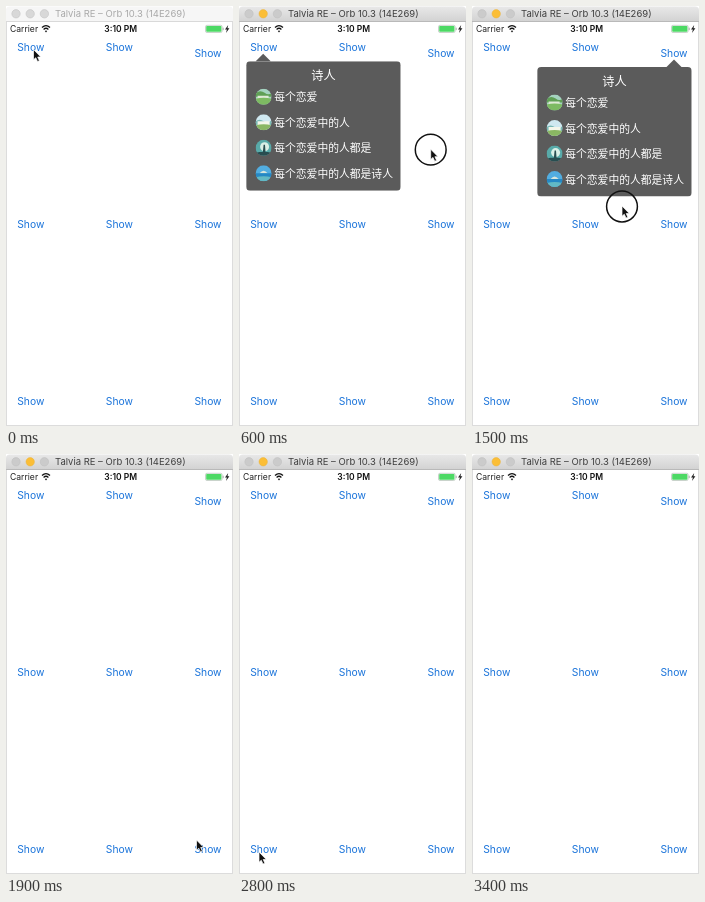
These frames come from a looping animation (227x420 px, 3500 ms). An HTML page:

```html
<!DOCTYPE html>
<html lang="zh-CN">
<head>
<meta charset="utf-8">
<title>Popup menu</title>
<style>
  html, body { margin: 0; width: 100%; height: 100%; overflow: hidden; background: #fff; }
  svg { display: block; }
  text { font-family: Inter, "Liberation Sans", sans-serif; }
  .cjk { font-family: "Noto Sans CJK SC", "Noto Sans CJK", sans-serif; fill: #fff; font-size: 10.8px; }
  .show { font-size: 10.3px; fill: #1b74da; text-anchor: middle; }
</style>
</head>
<body>
<svg width="227" height="420" viewBox="0 0 227 420">
  <defs>
    <linearGradient id="activeBar" x2="0" y2="1">
      <stop stop-color="#e8e8e8"/><stop offset="1" stop-color="#d2d2d2"/>
    </linearGradient>
    <clipPath id="round"><circle r="8"/></clipPath>
  </defs>
  <path d="M.5 420V15H226.5V420" fill="#fff" stroke="#dcdcdc"/>
  <path d="M0 419.5H227" stroke="#dcdcdc"/>

  <path id="bar" d="M0 15.5V4Q0 .5 4 .5H223Q227 .5 227 4V15.5Z"/>
  <path id="barLine" d="M0 15.5H227"/>
  <g stroke-width=".5">
    <circle class="light" cx="10" cy="7.8" r="4.2"/>
    <circle class="light" cx="24.2" cy="7.8" r="4.2"/>
    <circle class="light" cx="38.4" cy="7.8" r="4.2"/>
  </g>
  <text id="title" x="49" y="11.3" font-size="9.47">Talvia RE – Orb 10.3 (14E269)</text>

  <text x="4" y="26.2" font-size="8.6" fill="#222">Carrier</text>
  <g fill="none" stroke="#111" stroke-width="1.3">
    <path d="M36 21.5Q40 17.8 44 21.5M37.6 23.4Q40 21.2 42.4 23.4"/>
    <path d="M40 26.4L38.8 24.9Q40 24 41.2 24.9Z" fill="#111" stroke="none"/>
  </g>
  <text x="114.7" y="26.2" font-size="8.5" font-weight="600" text-anchor="middle" fill="#111">3:10 PM</text>
  <rect x="199.5" y="19.3" width="16.6" height="7.2" rx="1.4" fill="#fff" stroke="#a5b5a8" stroke-width=".6"/>
  <rect x="200.2" y="20" width="15.2" height="5.8" rx=".7" fill="#4cd964"/>
  <path d="M217.2 21.7V24.2" stroke="#999" stroke-width=".8"/>
  <path d="M222.2 19L219 23.6H220.9L220 27L223.4 22.2H221.5Z" fill="#222"/>

  <g id="buttons"></g>

  <g id="popup" fill="#000" fill-opacity=".645">
    <path id="arrow"/>
    <svg id="panel" width="154.5">
      <rect id="box" width="154.5" rx="4"/>
      <g id="menu" fill-opacity="1">
        <text class="cjk" x="77.2" y="18.8" style="font-size:12.2px" text-anchor="middle">诗人</text>
      </g>
    </svg>
  </g>

  <circle id="ring" r="15.4" fill="none" stroke="#111" stroke-width="1.5"/>
  <path id="cursor" d="M0 0V10.2L2.3 8.2L4 12L5.9 11.2L4.2 7.5H7.3Z" fill="#111" stroke="#fff" stroke-width=".7"/>
</svg>
<script>
const $ = id => document.getElementById(id);
const set = (el, attrs) => { for (const k in attrs) el.setAttribute(k, attrs[k]); };
const LOOP = 3500, STEP = 100, FULL = 129.6;

const buttons = [];
for (const row of [0, 1, 2]) for (const col of [0, 1, 2]) {
  const y = row ? 45 + row * 177 : col == 2 ? 50.5 : 45;
  const x = 24.8 + col * 88.6;
  $('buttons').insertAdjacentHTML('beforeend', `<text class="show" x="${x}" y="${y}">Show</text>`);
  buttons.push($('buttons').lastChild);
}

// Small landscape thumbnails, each drawn around its own centre
const scenes = [
  `<path fill="#a5d3c0" d="M-8-8H8V8H-8Z"/><path fill="#5f9f55" d="M-8-4Q-3-7 1-4T8-4V0H-8Z"/>
   <path fill="#dfe9d6" d="M-6-1H5V2H-6Z"/><path fill="#7dba62" d="M-8 2Q0 0 8 2V8H-8Z"/>`,
  `<path fill="#cfe8f0" d="M-8-8H8V8H-8Z"/><path fill="#79b9b5" d="M-8-1Q-4-4 0-1T8-2V3H-8Z"/>
   <path fill="#f4f6ea" d="M-6-1H6V3H-6Z"/><path fill="#8ab763" d="M-8 3Q0 1 8 3V8H-8Z"/>`,
  `<path fill="#58aaa9" d="M-8-8H8V8H-8Z"/><circle fill="#d9efe6" cx="1" cy="-1" r="4.5"/>
   <path fill="#284d50" d="M-8 5Q0 3 8 5V8H-8ZM0-3H1.4L2 5H-.8Z"/>`,
  `<path fill="#52ade0" d="M-8-8H8V8H-8Z"/><path fill="#d8e6dc" d="M-4 0Q0-5 4 0Z"/>
   <path fill="#2588c4" d="M-8 0H8V4H-8Z"/><path fill="#62b9c4" d="M-8 4Q0 2 8 4V8H-8Z"/>`
];
['每个恋爱', '每个恋爱中的人', '每个恋爱中的人都是', '每个恋爱中的人都是诗人'].forEach((label, i) => {
  const y = 35.6 + i * 25.5;
  $('menu').insertAdjacentHTML('beforeend',
    `<g transform="translate(17.4 ${y})" clip-path="url(#round)">${scenes[i]}</g>
     <text class="cjk" x="28" y="${y + 4.4}">${label}</text>`);
});

// Each popup: opening and closing times, left edge, edge by the arrow, arrow tip
const popups = [
  { open: 150, close: 650, x: 7.2, y: 55.2, tip: [24.2, 47.8] },
  { open: 1050, close: 1550, x: 65.2, y: 61, tip: [202, 53.5] },
  { open: 2050, close: 2490, x: 65.2, y: 402, tip: [202, 409], up: true },
  { open: 2850, close: 3120, x: 7.2, y: 402, tip: [24.2, 409], up: true, span: 250 }
];
const presses = { 100: 0, 1000: 2, 1100: 2, 2000: 8, 2900: 6 };
const clicks = [100, 600, 1000, 1500, 2000, 2500, 2900, 3100];

// Cursor path: time, x, y
const path = [
  [0, 27.5, 43.5], [300, 28, 44], [600, 191.7, 143.2], [700, 192, 143], [1000, 209, 51],
  [1100, 209, 50], [1200, 208, 52], [1500, 150, 200], [1600, 150, 200], [1900, 190.5, 386],
  [2000, 192, 387], [2100, 192, 387], [2400, 132.3, 260.5], [2500, 130, 255], [2800, 20, 398],
  [2900, 23, 395], [3100, 100, 290], [3200, 120, 250]
];

const ease = u => { u = Math.min(1, Math.max(0, u)); return u * u * (3 - 2 * u); };

function cursorAt(t) {
  const i = path.findIndex(p => p[0] >= t);
  if (i < 0) return null;
  const b = path[i], a = path[i - 1] || b;
  const k = a === b ? 0 : ease((t - a[0]) / (b[0] - a[0]));
  return [a[1] + (b[1] - a[1]) * k, a[2] + (b[2] - a[2]) * k];
}

function drawPopup(t) {
  let height = 0, p;
  for (p of popups) {
    const span = p.span || 300;
    height = FULL * (ease((t - p.open) / span) - ease((t - p.close) / span));
    if (height > 0.5) break;
  }
  const visible = height > 0.5;
  $('popup').style.display = visible ? '' : 'none';
  if (!visible) return;
  const [x, y] = p.tip;
  set($('arrow'), { d: `M${x} ${y}L${x - 7.5} ${p.y}H${x + 7.5}Z` });
  set($('panel'), { x: p.x, y: p.up ? p.y - height : p.y, height });
  set($('box'), { height });
}

function drawBar(active) {
  set($('bar'), { fill: active ? 'url(#activeBar)' : '#f6f6f6' });
  set($('barLine'), { stroke: active ? '#b9b9b9' : '#d9d9d9' });
  set($('title'), { fill: active ? '#3f3f3f' : '#a9a9a9' });
  document.querySelectorAll('.light').forEach((el, i) => {
    const lit = active && i == 1;
    set(el, { fill: lit ? '#fbbe36' : active ? '#cbcbcb' : '#d8d8d8', stroke: lit ? '#e9b03a' : '#bcbcbc' });
  });
}

function draw(now) {
  const t = Math.floor(now % LOOP / STEP) * STEP;
  drawBar(t > 0);
  drawPopup(t);
  buttons.forEach((el, i) => set(el, { opacity: presses[t] === i ? 0.42 : 1 }));
  const pos = cursorAt(t);
  $('cursor').style.display = pos ? '' : 'none';
  $('ring').style.display = pos && clicks.includes(t) ? '' : 'none';
  if (pos) {
    set($('cursor'), { transform: `translate(${pos})` });
    set($('ring'), { cx: pos[0], cy: pos[1] + 0.5 });
  }
}

const start = performance.now();
function tick() {
  draw(performance.now() - start);
  requestAnimationFrame(tick);
}
tick();
</script>
</body>
</html>
```
